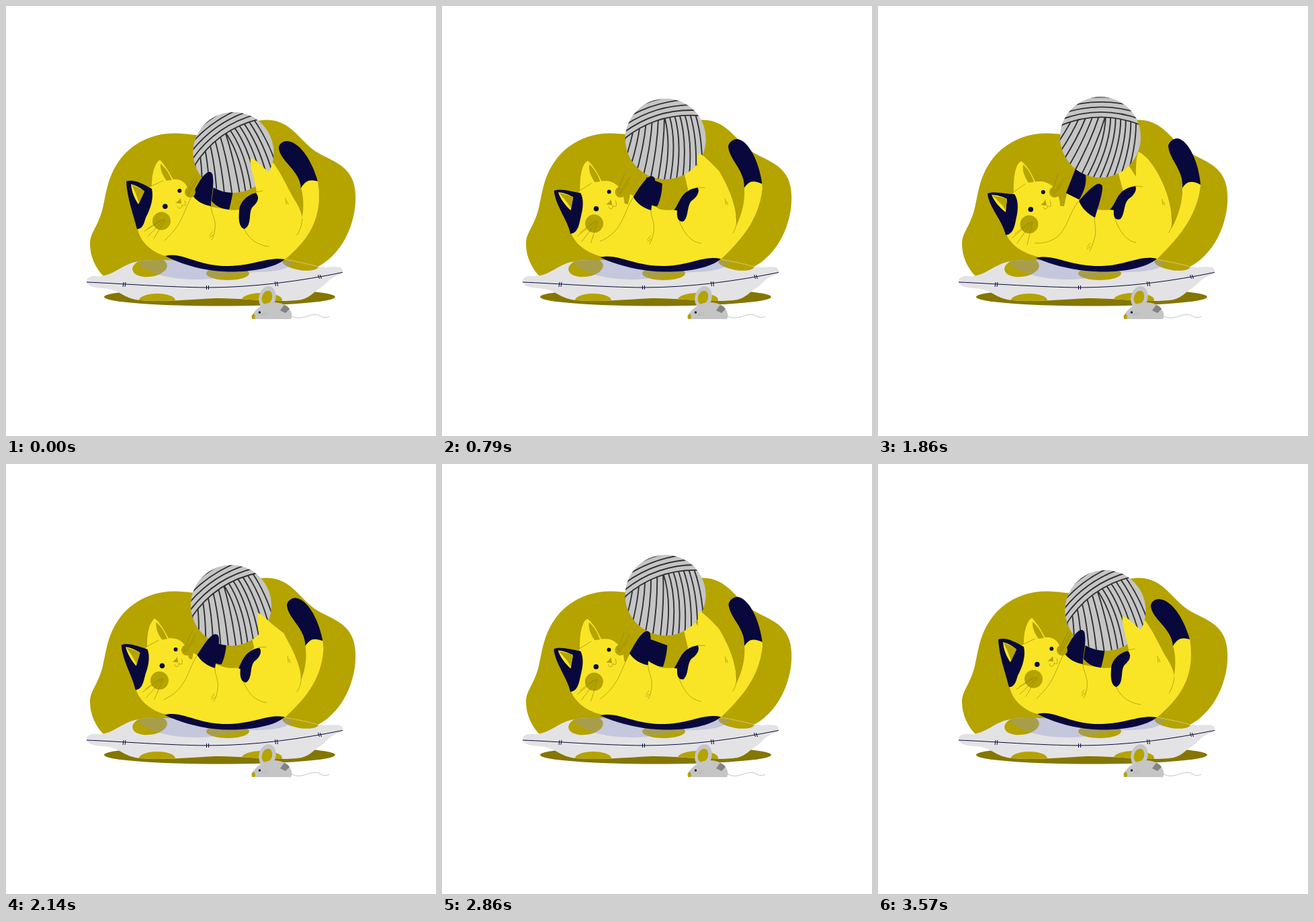
Animation, 640 px wide and 640 px high, one loop 3.64 s. Source, as an HTML page:

```html
<!DOCTYPE html>
<html lang="en">
<head>
<meta charset="utf-8">
<title>Cat with yarn</title>
<style>
html, body { margin: 0; width: 100%; height: 100%; overflow: hidden; background: #fff; }
svg { display: block; width: 100vw; height: 100vh; }
.yellow { fill: #f9e526; }
.navy { fill: #08083c; }
.olive { fill: #b5a300; }
.grey { fill: #c5c5c5; }
.line { fill: none; stroke: #8f8000; stroke-width: .6; stroke-linecap: round; }
.seam { fill: none; stroke: #08083c; stroke-width: 1; }
.yarn { fill: none; stroke: #303030; stroke-width: 1.9; }
</style>
</head>
<body>
<svg viewBox="0 0 640 640">
  <defs>
    <path id="pillow" d="M120 411C119 405 126 401 134 402C157 404 171 386 192 381C214 376 240 379 262 379L400 378C426 378 444 384 465 388C478 390 488 387 497 389C504 393 501 398 496 400C480 405 478 413 469 419C458 425 453 434 440 437C405 443 350 434 312 435C270 437 234 441 200 438C178 436 172 426 156 422C143 418 125 422 120 411Z"/>
    <clipPath id="pillowClip"><use href="#pillow"/></clipPath>
    <clipPath id="ballClip"><circle r="60"/></clipPath>
  </defs>

  <path class="olive" d="M145 402C133 390 125 372 125 354C125 336 139 327 145 296C150 272 153 252 168 231C186 205 217 189.500 250 189.500C275 189.500 290 196 320 190C348 184 362 169.500 388 169.500C427 170 437 203 465 219C487 231 512 238 518.500 268C525 300 513 340 493 364C484 375 474 383 464 388L300 402Z"/>
  <ellipse cx="318" cy="433" rx="172" ry="13.500" fill="#857600"/>
  <use href="#pillow" fill="#e3e3e5"/>
  <g clip-path="url(#pillowClip)">
    <g class="olive">
      <ellipse cx="214" cy="389" rx="26" ry="14" transform="rotate(-8 214 389)"/>
      <ellipse cx="330" cy="398" rx="32" ry="10"/>
      <ellipse cx="438" cy="384" rx="27" ry="9" transform="rotate(9 438 384)"/>
      <ellipse cx="225" cy="438" rx="27" ry="10"/>
      <ellipse cx="381" cy="437" rx="30" ry="10"/>
    </g>
    <path d="M193 378C204 396 240 407 282 407C325 407 352 395 378 396C398 395 421 393 429 381L415 374L237 370Z" fill="#9095cc" opacity=".36"/>
  </g>
  <path class="seam" d="M120 411C170 413 240 418.500 300 419C370 419 440 409 501 396.500M175 411l-1 7M178 411l-1 7M298.500 416v6M301.500 416v6M400.500 410l1 7M403.500 410l1 7M464.500 400l2 6M467.500 400l2 6"/>
  <path d="M415 377Q445 382 465 388" fill="none" stroke="#d8cf70" stroke-width=".7"/>

  <g id="cat"></g>

  <g id="mouse">
    <ellipse class="grey" cx="389" cy="434" rx="12.500" ry="17" transform="rotate(12 389 434)"/>
    <ellipse class="olive" cx="388.500" cy="434" rx="7.500" ry="10.500" transform="rotate(18 388.500 434)"/>
    <path class="grey" d="M366 466C364 458 374 450 382 445C396 438 412 441 420 449C425 454 427 461 424 466Z"/>
    <path class="olive" d="M367 466C364 462 366 459 369 458C372 461 371 466 369 466Z"/>
    <path d="M408 453L414 445C418 446 421 449 422 451L416 457Z" fill="#828282"/>
    <circle class="navy" cx="377.500" cy="456" r="1.700"/>
    <path d="M380 459l10-3M380 460l11 0M424 461C440 470 450 457 464 459.500C470 462 474 466 481 462" fill="none" stroke="#b4b4b4" stroke-width=".8"/>
  </g>
</svg>

<script>
const cat = document.getElementById('cat');
const LOOP = 3640;

function add(tag, attrs, parent = cat) {
  const el = document.createElementNS('http://www.w3.org/2000/svg', tag);
  for (const key in attrs) el.setAttribute(key, attrs[key]);
  parent.append(el);
  return el;
}

// Each part blends between two poses, driven by the body or the paws.
const parts = [];
function part(style, from, to, drive = 'body') {
  const nums = s => s.match(/-?[\d.]+/g).map(Number);
  parts.push({ el: add('path', { class: style }), from, a: nums(from), b: nums(to), drive });
}

const spots = [];
function spot(style, r, x0, y0, x1, y1) {
  spots.push({ el: add('circle', { class: style, r }), x0, y0, x1, y1 });
}

// Tail, rear leg and far paw
part('yellow',
  'M439 270C444 288 443 304 440 318L433 341L415 377C445 353 466 325 466 283C466 275 465 268 464 260L451 258Z',
  'M453 270C454 290 448 312 434 337L433 341L415 377C442 350 474 318 480 268C480 267 480 266 480 265L465 259Z');
part('navy',
  'M406 212C406 205 412 201 418 201C438 202 456 232 464 261C452 258 446 259 439 271C437 244 409 232 406 212Z',
  'M432 208C434 201 440 197 446 197C463 200 478 235 480 266C467 259 459 261 453 271C455 243 434 230 432 208Z');
part('yellow',
  'M370 250L385 220L399 235C410 250 418 268 425 282C433 293 440 305 441 317L380 310Z',
  'M358 250L365 225L384 254C396 262 405 270 415 282C425 293 430 305 433 317L366 280Z');
part('navy',
  'M310 262L338 272C337 284 334 296 332 303C322 303 311 297 306 290Z',
  'M294 242L309 250C310 260 310 271 299 289C291 288 284 283 280 278Z', 'paw');

// Yarn ball
const ball = add('g', {});
add('circle', { r: 60, class: 'grey' }, ball);
const yarn = add('g', { 'clip-path': 'url(#ballClip)' }, ball);
let fan = '';
for (let i = 0; i < 7; i++) {
  fan += `M${8 - 9.5 * i} -32Q${-6 - 9.5 * i} ${12 - 3 * i} ${-32 - 10 * i} ${62 - 6 * i}`;
  fan += `M${8 + 7.5 * i} -31Q${7 + 8 * i} 10 ${-22 + 10 * i} 62`;
}
add('path', { class: 'yarn', d: fan }, yarn);
add('path', { class: 'grey', d: 'M-62 -17Q0 -43 62 -17V-62H-62Z' }, yarn);
let band = '';
for (let i = 0; i < 5; i++) band += `M-62 ${-17 - 8.5 * i}Q0 ${-43 - 6.5 * i} 62 ${-17 - 8.5 * i}`;
add('path', { class: 'yarn', d: band }, yarn);

// Body and front leg
part('yellow',
  'M195 325C196 348 215 366 237 372C265 384 300 390 330 390C370 390 400 378 415 377C432 365 444 345 441 316C437 300 425 282 415 262L391 247C380 238 373 229 364 226C362 235 370 258 373 277C362 284 352 292 347 303C340 304 333 304 325 302L300 298L277 283L277 285C275 285 273 282 272 280C272 268 264 258 252 258C238 257 225 264 214 269C205 285 196 305 195 325Z',
  'M188 330C192 352 212 367 237 373C265 384 300 390 330 390C370 390 400 378 415 377C428 365 440 345 437 316C436 290 425 262 411 240L402 228C396 222 392 219 388 217C384 222 384 240 384 256C368 268 355 285 350 303C340 304 333 304 325 303L299 288L281 279L277 298C273 298 271 298 271 296C270 276 258 262 243 261C228 260 213 266 203 276C192 292 187 310 188 330Z');
part('navy',
  'M237 372C262 365 285 388 332 387C370 386 390 373 415 377C400 390 365 396 330 395.500C295 395 260 384 237 372Z',
  'M235 375C262 368 285 388 332 387C370 386 390 370 415 376C400 390 365 396 330 395.500C295 395 260 386 235 375Z');
part('navy',
  'M347 306C347 292 359 281 372 278C378 285 375 292 367 299C360 308 367 325 355 332C347 330 346 318 347 306Z',
  'M345 303C356 294 354 272 383 268C386 272 382 282 373 287C365 295 368 309 361 317C352 320 350 312 351 304Z');

// Near arm and paw
part('yellow',
  'M277 282L305 298L312 330L250 340Z',
  'M299 290L323 315L324 345L260 340Z', 'paw');
part('navy',
  'M277 281C283 270 290 255 298 249C303 245 308 247 308 255C310 268 305 285 305 298C293 296 283 290 277 281Z',
  'M299 290C310 278 318 269 326 265C331 264 335 266 334 272C333 285 327 300 323 315C313 310 303 301 299 290Z', 'paw');
part('line',
  'M277 282C264 305 264 324 236 349M305 298C306 312 313 316 311 332C310 340 308 345 306 348M307 336l-4 6M308 341l-5 4',
  'M299 290C280 310 283 355 234 353M322 315C322 326 326 333 322 347C320 355 317 360 315 365M316 353l-5 6M316 358l-5 4', 'paw');
part('line',
  'M354 331C362 348 375 356 391 358M372 277L382 275M441 317C440 327 437 335 433 341M416 286l1 9M418 290l2 5',
  'M353 317C360 337 370 350 384 352M381 268L394 269M437 312C440 322 437 330 433 337M423 287l1 9M425 291l2 5');

// Head
part('yellow',
  'M217 270C216 250 222 233 229 229C236 236 245 250 251 263Z',
  'M202 277C201 250 206 234 213 231C222 237 229 250 235 264Z');
part('olive',
  'M230 235C229 245 235 255 239 260L247 259C243 250 238 241 230 235Z',
  'M216 236C214 247 220 257 224 263L232 262C229 252 223 242 216 236Z');
part('navy',
  'M179 261C190 257 205 265 217 272C220 285 216 300 208 315C205 325 203 332 195 332C190 312 180 285 179 261Z',
  'M163 279C175 275 190 280 203 280C208 287 209 298 207 310C204 323 203 340 190 341C186 320 165 300 163 279Z');
part('yellow',
  'M186 265C194 267 202 272 206 276L197 295C190 285 187 275 186 265Z',
  'M169 281C177 281 186 284 192 287L190 307C181 300 173 291 169 281Z');
part('olive',
  'M187 266C195 269 202 273 206 276L198 293C196 286 192 276 187 266Z',
  'M170 282C178 283 186 285 192 287L190 304C186 297 179 290 170 282Z');
spot('olive', 8, 274, 277, 263, 277);
spot('olive', 13.5, 231.5, 320, 225, 325);
spot('navy', 3, 258.3, 275, 245.8, 277);
spot('navy', 3.8, 236.8, 298.3, 227.3, 302.7);
part('olive',
  'M252 293C255 292 258 289 260 286L261 294Z',
  'M242 296C245 294 247 292 249 288L251 297Z');
part('line',
  'M255 298C256 303 263 302 262 296C268 300 268 294 266 290M212 270L234 260',
  'M246 299C246 304 253 303 252 297C258 302 258 296 256 290M203 276L219 265');
part('line',
  'M235 317L206 335M236 318L211 343M237 318L220 346M231 318L211 331M269 278L283 250M270 280L286 254M271 282L285 260',
  'M228 321L200 345M229 322L207 353M230 322L222 355M225 322L204 339M259 277L268 250M260 279L278 255M262 280L275 264');

const spin = [[0, -36], [2, -50], [5, -58], [15, 5], [20, -22.5], [24, -38], [30, -36]];
const paws = [[0, 0], [2, .27], [5.5, 1], [10.5, 0], [16, 1], [19, .35], [20, .2], [21.5, 0], [25, .8], [29, 0], [30, 0]];

function track(keys, n) {
  const i = keys.findIndex(k => k[0] > n);
  const [x0, y0] = keys[i - 1], [x1, y1] = keys[i];
  return y0 + (y1 - y0) * (n - x0) / (x1 - x0);
}

function easeInOut(v, p) {
  return v < .5 ? (2 * v) ** p / 2 : 1 - (2 - 2 * v) ** p / 2;
}

// Ball lift: quick toss up, softer fall.
function lift(n) {
  return n < 15 ? 1 - (1 - n / 15) ** 4.3 : 1 - easeInOut(Math.min(1, (n - 15) / 14), 2.6);
}

function draw(ms) {
  const shown = Math.min(50, Math.floor((ms + 15) * 14 / 1000));
  const n = Math.floor(shown * 25 / 14) % 30;
  const sway = n < 15 ? n / 15 : Math.max(0, (29 - n) / 14);
  const pose = { body: sway / .93, paw: track(paws, n) };

  for (const p of parts) {
    const k = pose[p.drive];
    let i = 0;
    p.el.setAttribute('d', p.from.replace(/-?[\d.]+/g, () => {
      const v = p.a[i] + (p.b[i] - p.a[i]) * k;
      i++;
      return v.toFixed(2);
    }));
  }
  for (const s of spots) {
    s.el.setAttribute('cx', s.x0 + (s.x1 - s.x0) * pose.body);
    s.el.setAttribute('cy', s.y0 + (s.y1 - s.y0) * pose.body);
  }
  const x = 338.5 - 7.5 * pose.body, y = 218 - 22.7 * lift(n);
  ball.setAttribute('transform', `translate(${x} ${y}) rotate(${track(spin, n)})`);
}

const start = performance.now();
function tick() {
  draw((performance.now() - start) % LOOP);
  requestAnimationFrame(tick);
}
tick();
</script>
</body>
</html>
```
